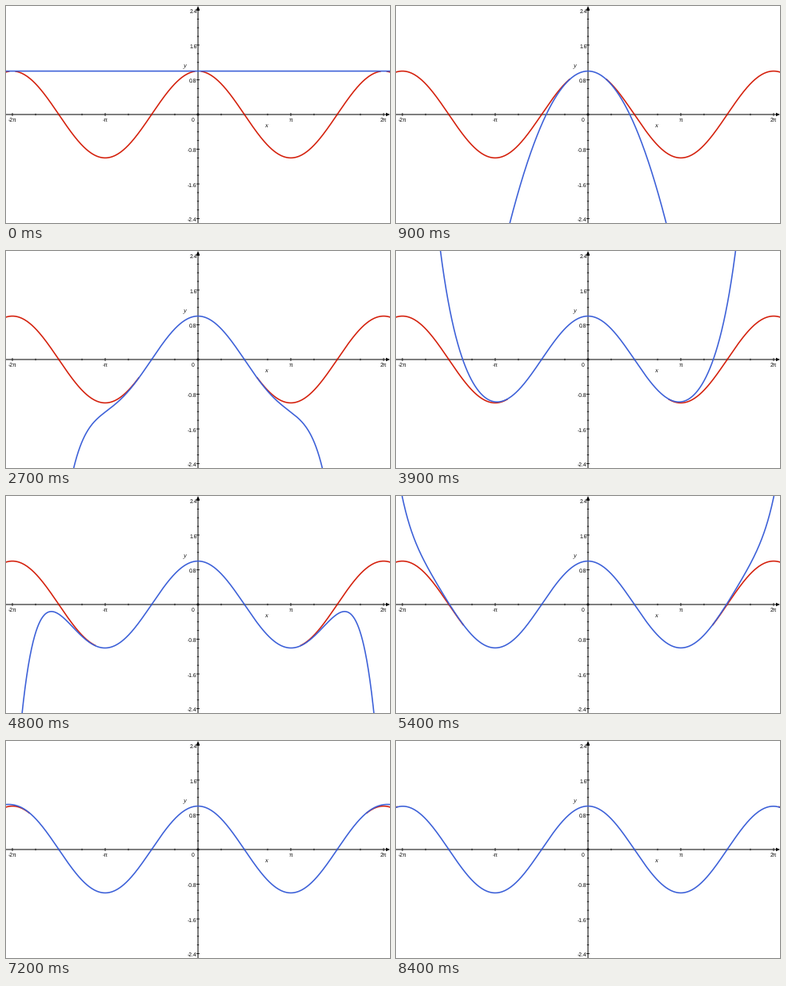
A matplotlib script for the animation above (9000 ms loop, 480 by 272 pixels).

```python
import math

import numpy as np
import matplotlib.pyplot as plt
from matplotlib.animation import FuncAnimation

W, H, DPI = 480, 272, 100
X0, Y0 = 240, 136            # origin in pixels
SX, SY = 116 / math.pi, 54.4  # pixels per unit
RED, BLUE, INK = "#d4200c", "#3c60d8", "black"
STEPS, STEP_MS = 10, 900
plt.rcParams["text.hinting"] = "none"


def pt(px):
    return px * 72 / DPI


def label(px, py, text, size=6.8, ha="center", **font):
    font.setdefault("family", "Liberation Sans")
    ax.text(px, py, text, fontsize=pt(size), ha=ha, va="center_baseline",
            color=INK, zorder=5, **font)


def line(xs, ys, color=INK, width=1.0, **kw):
    return ax.plot(xs, ys, color=color, lw=pt(width), snap=False, **kw)[0]


fig = plt.figure(figsize=(W / DPI, H / DPI), dpi=DPI, facecolor="white")
ax = fig.add_axes([0, 0, 1, 1])
ax.set_xlim(0, W)
ax.set_ylim(H, 0)
ax.axis("off")

# Axes with arrowheads
line([0, W - 3], [Y0, Y0], zorder=1)
line([X0, X0], [3, H], zorder=1)
ax.fill([W, W - 5, W - 5], [Y0, Y0 - 2.2, Y0 + 2.2], color=INK, lw=0)
ax.fill([X0, X0 - 2.2, X0 + 2.2], [0, 5, 5], color=INK, lw=0)

# Ticks: every quarter of a labelled interval
for k in range(-8, 9):
    px, r = X0 + k * 29, 2 if k % 4 == 0 else 1.2
    line([px, px], [Y0 - r, Y0 + r], width=0.8, solid_capstyle="butt")
for k in range(-12, 13):
    py, r = Y0 - k * 0.2 * SY, 2 if k % 4 == 0 else 1.2
    line([X0 - r, X0 + r], [py, py], width=0.8, solid_capstyle="butt")

for k, text in ((-2, "-2π"), (-1, "-π"), (1, "π"), (2, "2π")):
    label(X0 + k * 116, 142, text)
label(233.5, 142, "0")
for k in (-3, -2, -1, 1, 2, 3):
    label(238.6, Y0 - k * 0.8 * SY + 1, f"{k * 0.8:.1f}", ha="right")
label(224, 75, "y", 8.5, family="Liberation Serif", style="italic")
label(324.7, 149.5, "x", 8.5, family="Liberation Serif", style="italic")

px = np.linspace(-2, W + 2, 1200)
x = (px - X0) / SX
cosine = line(px, px, RED, 1.6, zorder=3)
approx = line(px, px, BLUE, 1.6, zorder=4)


def taylor_cos(terms):
    return sum((-1) ** n * x ** (2 * n) / math.factorial(2 * n)
               for n in range(terms + 1))


def update(step):
    y = taylor_cos(step)
    approx.set_ydata(np.clip(Y0 - SY * y, -500, H + 500))
    # Drop the covered stretch so no red fringe shows around the blue
    covered = np.abs(y - np.cos(x)) < 0.006
    cosine.set_ydata(np.where(covered, np.nan, Y0 - SY * np.cos(x)))
    return cosine, approx


anim = FuncAnimation(fig, update, frames=STEPS, interval=STEP_MS,
                     repeat=True, repeat_delay=0)
plt.show()
```
